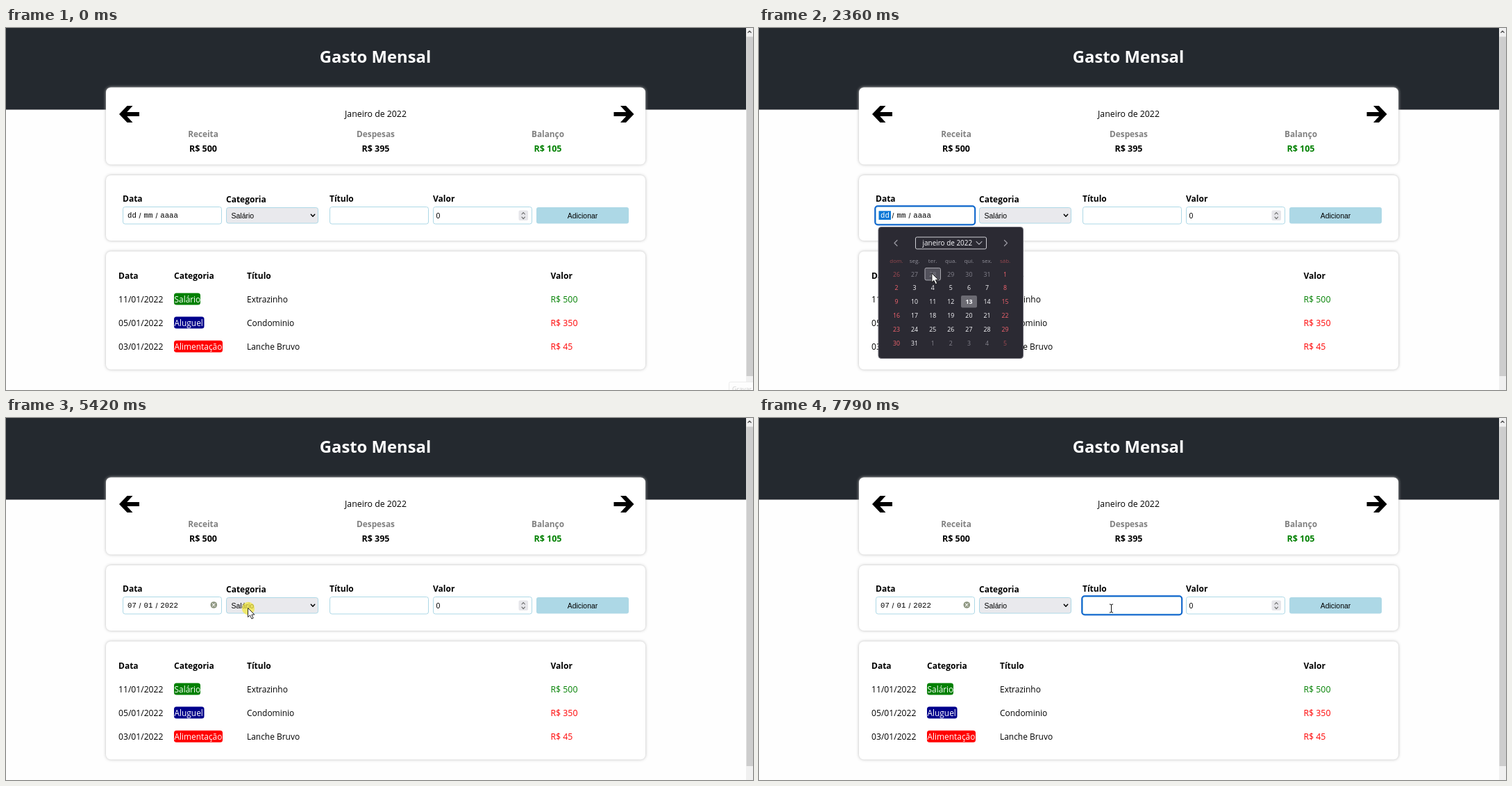
Recreate the animation shown at these times as an HTML page. Size 1076 by 521 pixels, loop 8000 ms.

```html
<!DOCTYPE html>
<html lang="pt-BR">
<head>
<meta charset="utf-8">
<title>Gasto Mensal</title>
<style>
html, body { margin: 0; width: 100%; height: 100%; overflow: hidden; background: #fefefe; }
svg { display: block; width: 100vw; height: 100vh; }
text { font-family: "Open Sans", "Noto Sans", sans-serif; white-space: pre; }
.ui { font-family: "Liberation Sans", Arial, sans-serif; }
.mono { font-family: "Liberation Mono", monospace; }
.b { font-weight: 700; }
.mid { text-anchor: middle; }
.card { fill: #fff; filter: drop-shadow(0 0 2px #bbb); }
.menu { filter: drop-shadow(2px 2px 1.5px rgba(0, 0, 0, .5)); }
.line { fill: none; stroke-linecap: round; stroke-linejoin: round; }
</style>
</head>
<body>
<svg id="stage" viewBox="0 0 1076 521" preserveAspectRatio="none"></svg>
<script>
const stage = document.getElementById('stage');
const LOOP = 8000;

const text = (x, y, s, size = 12, fill = '#000', cls = '') =>
  `<text x="${x}" y="${y}" font-size="${size}" fill="${fill}" class="${cls}">${s}</text>`;
const rect = (x, y, w, h, r, fill, more = '') =>
  `<rect x="${x}" y="${y}" width="${w}" height="${h}" rx="${r}" fill="${fill}" ${more}/>`;
const line = (d, color, width = 1.2) =>
  `<path class="line" d="${d}" stroke="${color}" stroke-width="${width}"/>`;
const group = (id, body, more = '') => `<g id="${id}" ${more}>${body}</g>`;
const bold = (x, y, s) => text(x, y, s, 12, '#000', 'b');
const card = (y, h) => rect(144, y, 777, h, 7, '#fff', 'class="card"');
const field = (x, y, w, h, fill) => rect(x, y, w, h, 3, fill, 'stroke="#add8e6"');
const ring = (id, x) => rect(x, 256.2, 144, 27, 4, 'none', `id="${id}" stroke="#0a62cc" stroke-width="2"`);

function page() {
  const arrow = 'M163 124L174.5 112H182.5L174.3 121H192V127H174.3L182.5 136H174.5Z';
  const totals = [[284, 'Receita', 'R$ 500', '#000'], [532.5, 'Despesas', 'R$ 395', '#000'], [780.5, 'Balanço', 'R$ 105', '#008000']];
  return rect(0, 0, 1076, 521, 0, '#fefefe') + rect(0, 0, 1066, 117.5, 0, '#24292f') +
    text(532, 49.5, 'Gasto Mensal', 23.8, '#fff', 'b mid') +
    card(85.5, 111) + card(212, 94) + card(321.5, 170) +
    `<path d="${arrow}"/><path d="${arrow}" transform="matrix(-1 0 0 1 1067.5 0)"/>` +
    text(532.5, 128, 'Janeiro de 2022', 12.3, '#000', 'mid') +
    totals.map(([x, name, sum, color]) =>
      text(x, 157, name, 11.8, '#808080', 'b mid') + text(x, 177.6, sum, 12.5, color, 'b mid')).join('') +
    rect(1066, 0, 10, 521, 0, '#f0f0f0') + rect(1066.5, 12.5, 9.5, 488.5, 0, '#cdcdcd') +
    line('M1068.8 6.5L1071 4.3 1073.2 6.5', '#555', 1.3);
}

function form() {
  return bold(168, 249.8, 'Data') + bold(317, 250.6, 'Categoria') + bold(466, 249.8, 'Título') + bold(615, 249.8, 'Valor') +
    field(168.5, 257.5, 142, 24.5, '#fff') + field(317.5, 258.5, 132, 22.5, '#e9e9ed') +
    field(466.5, 257.5, 142, 24.5, '#fff') + field(615.5, 257.5, 142, 24.5, '#fff') +
    rect(764, 258, 133, 23.5, 3, '#add8e6') +
    text(830.5, 273.5, 'Adicionar', 10.4, '#000', 'ui mid') +
    text(324.5, 273.5, 'Salário', 10.5, '#000', 'ui') + line('M439.3 268.3L442 271.2 444.7 268.3', '#000', 1.5) +
    text(619.5, 273.5, '0', 10.5, '#000', 'ui') +
    rect(738.5, 262.5, 13.5, 14.5, 2, '#e6e6ea') +
    line('M743 268L745.2 265.6 747.4 268M743 272.2L745.2 274.6 747.4 272.2', '#666', 1.1);
}

function table() {
  const rows = [
    ['11/01/2022', 'Salário', '#008000', 38, 'Extrazinho', 'R$ 500', '#008000'],
    ['05/01/2022', 'Aluguel', '#00008b', 43.5, 'Condominio', 'R$ 350', '#f00'],
    ['03/01/2022', 'Alimentação', '#f00', 70, 'Lanche Bruvo', 'R$ 45', '#f00']
  ];
  return bold(162, 361, 'Data') + bold(242, 361, 'Categoria') + bold(347, 361, 'Título') + bold(784.5, 361, 'Valor') +
    rows.map(([date, tag, color, w, title, sum, sumColor], i) => {
      const y = 395 + 34.1 * i;
      return text(162, y, date, 12.15) + rect(242, y - 13.5, w, 17, 3.5, color) +
        text(242.5, y, tag, 11.9, '#fff') + text(347, y, title, 11.95) + text(784.5, y, sum, 12.3, sumColor);
    }).join('');
}

const dayX = c => 198 + 26.1 * c;
const dayY = r => 354.3 + 19.85 * r;

function calendar() {
  const edge = c => c % 6 === 0;
  let out = rect(172, 286.5, 208.5, 189, 4, '#2b2a33', 'stroke="#6a6972"') +
    line('M199 305.5L195 309.5 199 313.5M353.5 305.5L357.5 309.5 353.5 313.5', '#9b9aa3', 1.2) +
    rect(225.5, 301, 102, 17, 2, 'none', 'stroke="#d0d0d6"') +
    text(235.5, 313, 'janeiro de 2022', 9.95, '#fbfbfe') +
    line('M313 307.3L317 311.3 321 307.3', '#b5b4bd', 1.1) +
    rect(291, 385, 23, 17.5, 2, '#6b6a72') +
    rect(0, 0, 22.5, 17.5, 2, '#52515b', 'id="hover" stroke="#a9a8b0"');
  ['dom.', 'seg.', 'ter.', 'qua.', 'qui.', 'sex.', 'sáb.'].forEach((d, c) => {
    out += text(dayX(c), 337.5, d, 8, edge(c) ? '#97484f' : '#8f8e98', 'mid');
  });
  for (let i = 0; i < 42; i++) {
    const c = i % 7, n = i - 5, inside = n > 0 && n < 32;
    const day = inside ? n : n < 1 ? n + 31 : n - 31;
    const color = edge(c) ? (inside ? '#f5646e' : '#a14a52') : inside ? '#fbfbfe' : '#83828c';
    out += text(dayX(c), dayY(Math.floor(i / 7)) + 3.3, day, 8.8, color, n === 13 ? 'mid b' : 'mid');
  }
  return out;
}

function dropdown() {
  return rect(317, 282, 133, 86.5, 1, '#2b2a33', 'class="menu"') +
    rect(317.5, 0, 132, 20, 0, '#52525e', 'id="option"') +
    ['Alimentação', 'Aluguel', 'Salário'].map((s, i) => text(322.5, 318.5 + 20 * i, s, 9.7, '#fbfbfe')).join('');
}

const mono = (id, x, s) => `<text id="${id}" class="mono" x="${x}" y="273.3" font-size="10.7">${s}</text>`;
stage.innerHTML = page() + form() + table() +
  group('recorder', rect(1041.5, 509.5, 40, 20, 2, '#fdfdfd', 'stroke="#ececec"') + text(1046, 523, 'Gravar', 9, '#ccc')) +
  ring('dateRing', 167.2) + ring('titleRing', 465.2) +
  rect(172.5, 263.3, 17.5, 12.7, 0, '#0a78d7', 'id="select"') +
  mono('dd', 175, 'dd') + mono('mm', 198.5, 'mm') + mono('yyyy', 222.3, 'aaaa') +
  text(191.5, 273.5, '/', 10.5, '#000', 'ui') + text(215.5, 273.5, '/', 10.5, '#000', 'ui') +
  group('clear', '<circle cx="299.3" cy="269" r="4.8" fill="#8d9680"/>' + line('M297.5 267.2L301.1 270.8M301.1 267.2L297.5 270.8', '#fff', 1.1)) +
  line('M471.5 263V276', '#000', 1).replace('<path', '<path id="caret"') +
  group('cal', calendar()) + group('menu', dropdown()) +
  '<circle id="glow" r="9.2" fill="#f3e73c"/>' +
  group('pointer', '<path d="M0 0V13L3 10.3 5.4 15.5 7.7 14.5 5.4 9.5H9.5Z" fill="#fff" stroke="#111" stroke-width=".9"/>') +
  group('beam', line('M-2.2 -6Q0 -6 0 -4.8Q0 -6 2.2 -6M0 -5V5M-2.2 6Q0 6 0 4.8Q0 6 2.2 6', '#111', 1));

const el = {};
stage.querySelectorAll('[id]').forEach(e => el[e.id] = e);
const show = (e, on) => e.setAttribute('visibility', on ? 'visible' : 'hidden');
const move = (e, x, y) => e.setAttribute('transform', `translate(${x} ${y})`);

// start, end, number of jumps, target x, target y
const moves = [
  [330, 1080, 12, 269.5, 284.5], [1150, 1220, 2, 263.5, 271.5],
  [1750, 2280, 9, 250, 352], [2360, 2860, 8, 225.5, 376.5],
  [3525, 3930, 6, 329, 380], [4210, 4690, 7, 348.5, 273.5],
  [5760, 6020, 4, 358, 362], [6080, 6160, 2, 357, 347.5],
  [6710, 7120, 7, 507.5, 274]
];
const clicks = [1400, 4070, 5420, 6440, 7260];

function cursorAt(t) {
  let x = 893, y = 484;
  for (const [t0, t1, n, tx, ty] of moves) {
    if (t < t0) break;
    const k = Math.min(n, Math.floor((t - t0) / (t1 - t0) * (n - 1) + 1e-6) + 1) / n;
    const p = k * k * (3 - 2 * k);
    x += (tx - x) * p;
    y += (ty - y) * p;
  }
  return [x, y];
}

function draw(t) {
  const [x, y] = cursorAt(t);
  const between = (a, b) => t >= a && t < b;
  const dateFocus = between(1400, 5420), filled = t >= 4140;
  const calOpen = between(1550, 4210), menuOpen = between(5490, 6710);

  show(el.recorder, t < 70);
  show(el.dateRing, dateFocus);
  show(el.select, dateFocus);
  show(el.titleRing, t >= 7260);
  show(el.caret, between(7290, 7790));
  show(el.clear, filled);
  el.dd.textContent = filled ? '07' : 'dd';
  el.mm.textContent = filled ? '01' : 'mm';
  el.yyyy.textContent = filled ? '2022' : 'aaaa';
  el.dd.setAttribute('fill', dateFocus ? '#fff' : '#000');

  el.cal.setAttribute('opacity', calOpen ? Math.min(1, .35 + (t - 1550) / 215) : 0);
  const col = Math.round((x - 198) / 26.1), row = Math.round((y - 354.3) / 19.85);
  show(el.hover, calOpen && col >= 0 && col < 7 && row >= 0 && row < 6);
  move(el.hover, dayX(col) - 11.2, dayY(row) - 8.9);

  show(el.menu, menuOpen);
  const option = y < 285 ? 3 : Math.max(0, Math.min(3, Math.floor((y - 285) / 20)));
  el.option.setAttribute('y', 285 + 20 * option);

  const hit = clicks.find(c => between(c, c + 130));
  show(el.glow, hit !== undefined);
  el.glow.setAttribute('opacity', t - hit < 70 ? .72 : .4);
  move(el.glow, x + .5, y + .5);

  const beam = x > 466 && y < 282 && t > 6700;
  show(el.pointer, t >= 330 && !beam);
  show(el.beam, beam);
  move(el.pointer, x, y);
  move(el.beam, x, y);
}

const start = performance.now();
function tick() {
  draw((performance.now() - start) % LOOP);
  requestAnimationFrame(tick);
}
tick();
</script>
</body>
</html>
```
